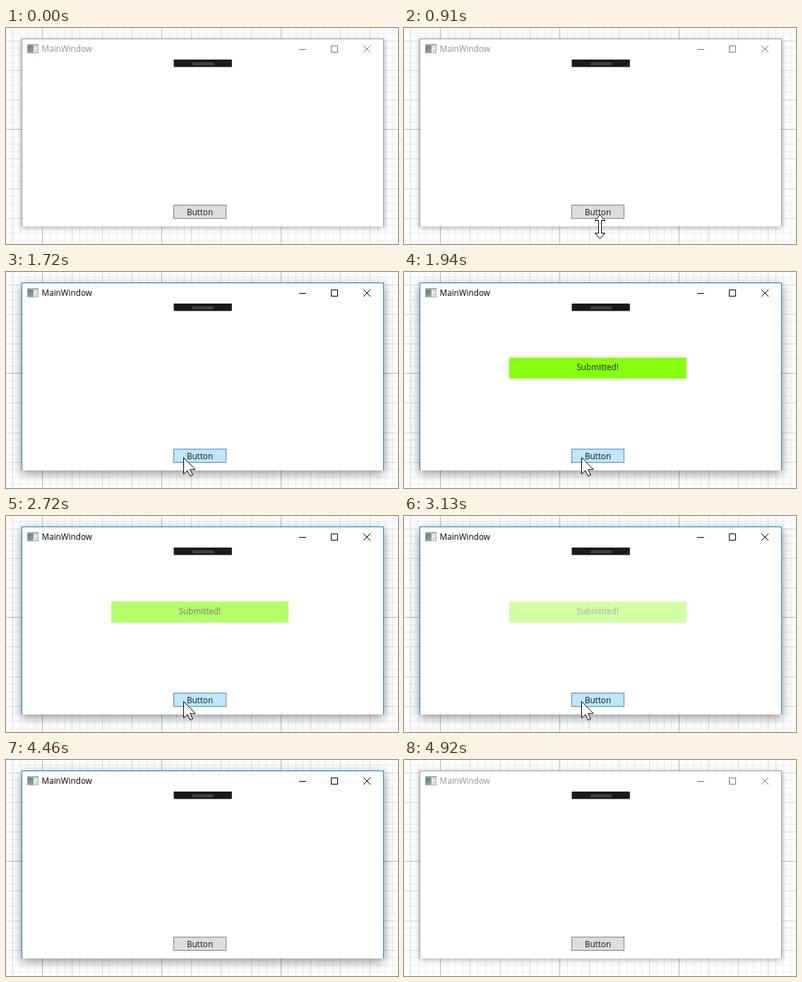
An HTML page for the animation above (5000 ms loop, 555 by 308 pixels).

```html
<!DOCTYPE html>
<html lang="en">
<head>
<meta charset="utf-8">
<title>Submit banner</title>
<style>
  html, body { margin: 0; width: 100%; height: 100%; overflow: hidden; background: #fff; }
  .stage { position: relative; width: 555px; height: 308px; overflow: hidden; }
  svg { position: absolute; left: 0; top: 0; }
  text { font: 11.7px "Open Sans", "Noto Sans", sans-serif; }
  .mid { text-anchor: middle; fill: #1a1a1a; }
  .crisp { shape-rendering: crispEdges; }

  .window {
    position: absolute; left: 22px; top: 15px; width: 513px; height: 268px;
    box-sizing: border-box; background: #fff; border: 1px solid; border-bottom: 0;
  }
  .window, .title, .controls, .button, .banner, .resize, .arrow {
    animation: 5s step-end infinite;
  }
  .window   { animation-name: frame; }
  .title    { animation-name: title; }
  .controls { animation-name: controls; }
  .button   { animation-name: hover; }
  .banner   { animation-name: fade; }
  .resize   { animation-name: resize; }
  .arrow    { animation-name: arrow; }

  @keyframes frame {
    0%, 98.4%, 100% { border-color: #9c9c9c; box-shadow: 0 2px 8px rgba(0, 0, 0, .32); }
    34.4% { border-color: #1883d7; box-shadow: 0 4px 14px rgba(0, 0, 0, .44); }
  }
  @keyframes title {
    0%, 98.4%, 100% { fill: #929292; }
    34.4% { fill: #000; }
  }
  @keyframes controls {
    0%, 98.4%, 100% { stroke: #777; }
    34.4% { stroke: #000; }
  }
  @keyframes hover {
    0%, 89.2%, 100% { fill: #ddd; stroke: #828282; }
    20% { fill: #bee6fd; stroke: #4f8db9; }
  }
  @keyframes fade {
    0%, 75.6%, 100% { opacity: 0; }
    35.8% { opacity: 1; }
    38.8% { opacity: .93; animation-timing-function: steps(15, end); }
    62.6% { opacity: .36; }
    65.8% { opacity: .27; }
    70.4% { opacity: .16; }
    74%   { opacity: .06; }
  }
  @keyframes resize {
    0%, 20%, 100% { opacity: 0; }
    18.2% { opacity: 1; }
  }
  @keyframes arrow {
    0%, 89.2%, 100% { opacity: 0; transform: translate(251px, 264px); }
    20%   { opacity: 1; transform: translate(268px, 270px); }
    21.6% { opacity: 1; transform: translate(260px, 267px); }
    23.2% { opacity: 1; transform: translate(254px, 265px); }
    24.8% { opacity: 1; transform: translate(251px, 264px); }
  }
</style>
</head>
<body>
<div class="stage">
  <svg class="crisp" width="555" height="308" fill="none">
    <path id="minor" stroke="#ececec"/>
    <path id="major" stroke="#d8d8d8"/>
    <path id="heavy" stroke="#b8b8b8"/>
  </svg>

  <div class="window"></div>

  <svg width="555" height="308">
    <defs>
      <linearGradient id="teal" x2="1" y2="1">
        <stop stop-color="#5f7d78"/>
        <stop offset="1" stop-color="#93aba4"/>
      </linearGradient>
    </defs>

    <!-- title bar -->
    <g class="crisp">
      <rect x="30" y="23" width="16" height="13" fill="#a8abab"/>
      <rect x="31" y="25" width="14" height="10" fill="#eceeee"/>
      <rect x="31" y="25" width="8" height="10" fill="url(#teal)"/>
      <rect x="40" y="26" width="4" height="2" fill="#d2d6d6"/>
      <rect x="41" y="30" width="3" height="4" fill="#cdd2d2"/>
    </g>
    <text class="title" x="50.6" y="34">MainWindow</text>
    <g class="controls" fill="none">
      <path d="M415 30.5h10M460.5 25.5h9v9h-9z"/>
      <path d="M506 25l10 10M516 25l-10 10"/>
    </g>

    <!-- toolbar handle -->
    <rect x="237.5" y="45" width="82.3" height="10.6" fill="#191b1a"/>
    <rect x="264" y="49" width="30" height="4" fill="#424242"/>

    <g class="banner">
      <rect x="149" y="122" width="251" height="30" fill="#7fff00"/>
      <text class="mid" x="274.3" y="140">Submitted!</text>
    </g>

    <rect class="button" x="237.5" y="252.5" width="74" height="19"/>
    <text class="mid" x="274.5" y="267">Button</text>

    <!-- pointers -->
    <g fill="#fff" stroke="#000">
      <path class="resize" d="M277.5 266.5l7 8h-5v18h5l-7 8l-7-8h5v-18h-5z"/>
      <path class="arrow" d="M.5 .5v23.5l5.3-5l4 8l3.6-1.7l-3.9-7.7h7.6z"/>
    </g>
  </svg>
</div>

<script>
  const gap = 10.55;
  const paths = { minor: '', major: '', heavy: '' };

  // Every 4th line is stronger, every 16th strongest.
  function rule(origin, size, segment) {
    for (let i = Math.ceil(-origin / gap); origin + i * gap < size; i++) {
      const kind = i % 16 === 0 ? 'heavy' : i % 4 === 0 ? 'major' : 'minor';
      paths[kind] += segment(Math.round(origin + i * gap) + 0.5);
    }
  }

  rule(51.2, 555, x => `M${x} 0V308`);
  rule(144.2, 308, y => `M0 ${y}H555`);
  for (const id in paths) document.getElementById(id).setAttribute('d', paths[id]);
</script>
</body>
</html>
```
